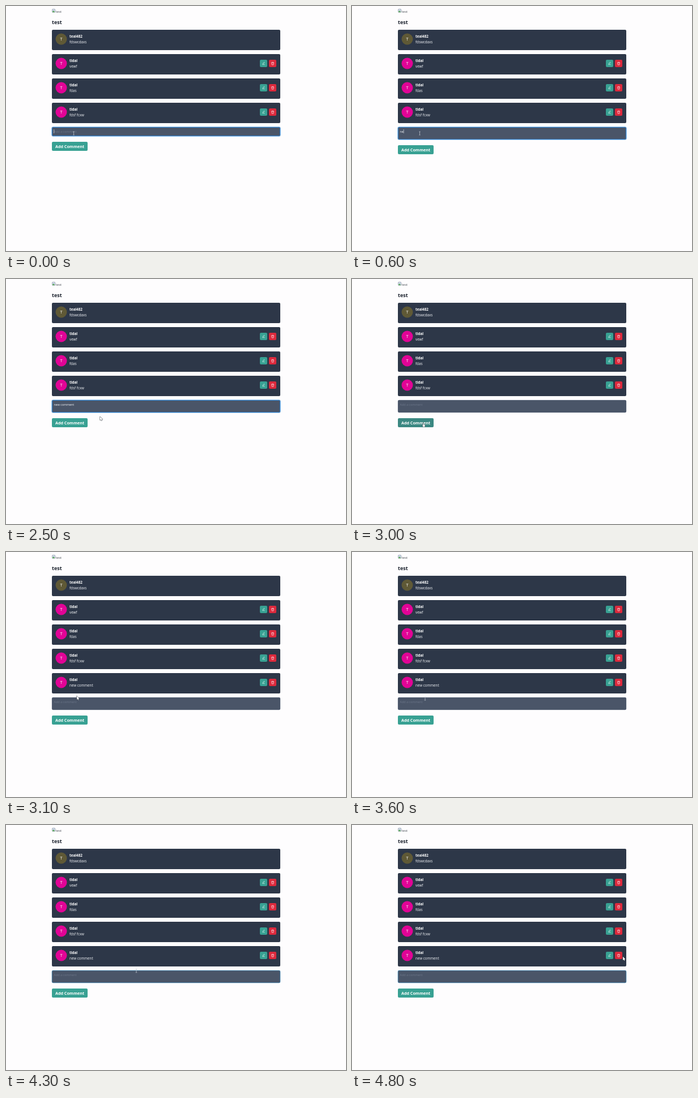
An HTML page with a canvas that plays this animation: 600 by 433 pixels, repeating every 5 s.

```html
<!DOCTYPE html>
<html lang="en">
<head>
<meta charset="utf-8">
<title>Comments</title>
<style>
  html, body { margin: 0; width: 100%; height: 100%; overflow: hidden; background: #fefdfe; }
  canvas { display: block; width: 600px; height: 433px; }
</style>
</head>
<body>
<canvas id="stage" width="600" height="433"></canvas>
<script>
const ctx = document.getElementById('stage').getContext('2d');
const LOOP = 5000;
const FONT = '"Open Sans", "Noto Sans", sans-serif';
const CARD = '#2d3748', FIELD = '#4a5568', TEAL = '#38a193', RED = '#dc2a3d', PINK = '#e10496';
const LEFT = 81, WIDTH = 403, PITCH = 43;

const comments = [
  { name: 'teal482', body: 'fdswcdaxs', color: '#5f5936' },
  { name: 'tidal', body: 'vewf', color: PINK, own: true },
  { name: 'tidal', body: 'fdas', color: PINK, own: true },
  { name: 'tidal', body: 'fdsf fcxw', color: PINK, own: true },
  { name: 'tidal', body: 'new comment', color: PINK, own: true }
];

// [time, typed text]
const typing = [[0, ''], [600, 'ne'], [700, 'new'], [900, 'new '], [1000, 'new co'], [1800, 'new comment'], [3000, '']];

// [time, x, y, pointer shape]
const moves = [
  [0, 119.5, 225, 'beam'], [2200, 119.5, 225, 'beam'], [2300, 143, 223, 'beam'],
  [2400, 171, 231, 'beam'], [2500, 166, 243, 'arrow'], [2600, 140, 253, 'hand'],
  [2700, 126, 255, 'hand'], [3100, 125, 254.5, 'arrow'], [3500, 125, 254.5, 'arrow'],
  [3600, 129, 259, 'beam'], [4000, 158, 262.5, 'beam'], [4200, 160, 263, 'beam'],
  [4600, 440, 242, 'arrow'], [4700, 479, 234, 'arrow'], [4800, 478, 232.5, 'arrow']
];

function box(x, y, w, h, r, fill) {
  ctx.beginPath();
  ctx.roundRect(x, y, w, h, r);
  ctx.fillStyle = fill;
  ctx.fill();
}

function outline(x, y, w, h, color, width) {
  ctx.beginPath();
  ctx.roundRect(x, y, w, h, 2);
  ctx.strokeStyle = color;
  ctx.lineWidth = width;
  ctx.stroke();
}

function text(str, x, y, size, weight, color, align = 'left') {
  ctx.font = `${weight} ${size}px ${FONT}`;
  ctx.fillStyle = color;
  ctx.textAlign = align;
  ctx.fillText(str, x, y);
}

function line(points, color, width, close) {
  ctx.beginPath();
  points.forEach(([x, y], i) => i ? ctx.lineTo(x, y) : ctx.moveTo(x, y));
  if (close) ctx.closePath();
  ctx.strokeStyle = color;
  ctx.lineWidth = width;
  ctx.stroke();
}

function pencil(x, y) {
  line([[x - 1.4, y + 1.1], [x - 1.2, y - 0.1], [x + 1, y - 2.2], [x + 1.9, y - 1.3], [x - 0.3, y + 0.9]], '#e3f5f2', 0.6, true);
  line([[x - 2.2, y + 2.2], [x + 2.3, y + 2.2]], '#e3f5f2', 0.6);
}

function trash(x, y) {
  line([[x - 2.4, y - 1.5], [x + 2.4, y - 1.5]], '#fff0f2', 0.7);
  line([[x - 0.9, y - 1.6], [x - 0.9, y - 2.3], [x + 0.9, y - 2.3], [x + 0.9, y - 1.6]], '#fff0f2', 0.5);
  line([[x - 1.7, y - 1.4], [x - 1.4, y + 2.4], [x + 1.4, y + 2.4], [x + 1.7, y - 1.4]], '#fff0f2', 0.7);
}

function card(c, i) {
  const y = 42 + i * PITCH;
  box(LEFT, y, WIDTH, 36, 2, CARD);
  ctx.beginPath();
  ctx.arc(97.5, y + 16.5, 10, 0, Math.PI * 2);
  ctx.fillStyle = c.color;
  ctx.fill();
  text('T', 97.5, y + 19.2, 7.4, 500, '#fff', 'center');
  text(c.name, 112, y + 14.2, 6.25, 700, '#fff');
  text(c.body, 112, y + 24, 6.25, 400, '#f4f6f9');
  if (!c.own) return;
  box(448, y + 10, 13, 13, 2, TEAL);
  box(464, y + 10, 13, 13, 2, RED);
  pencil(454.5, y + 16.4);
  trash(470.6, y + 16.6);
}

function header() {
  // broken image icon with alt text
  box(81.3, 5.2, 5.6, 6.2, 0.4, '#c9d4e4');
  outline(81.3, 5.2, 5.6, 6.2, '#8d949c', 0.5);
  ctx.beginPath();
  ctx.moveTo(81.7, 11);
  ctx.lineTo(83.5, 8);
  ctx.lineTo(86.3, 10.8);
  ctx.fillStyle = '#4fa34b';
  ctx.fill();
  text('test', 87.6, 12, 6.1, 400, '#4a4f58');
  text('test', 81, 32, 9, 700, '#1a202c');
}

function field(t, y, h, typed) {
  const active = t < 3000, refocus = t >= 4200;
  if (active) outline(LEFT - 0.3, y - 0.3, WIDTH + 0.6, h + 0.6, '#9cc7ea', 1);
  box(LEFT, y, WIDTH, h, 2, FIELD);
  if (active) outline(LEFT + 0.4, y + 0.4, WIDTH - 0.8, h - 0.8, '#3182ce', 1);
  else if (refocus) outline(LEFT + 0.2, y + 0.2, WIDTH - 0.4, h - 0.4, '#4189b8', 0.8);
  else outline(LEFT + 0.3, y + 0.3, WIDTH - 0.6, h - 0.6, '#566278', 0.6);

  if (typed) text(typed, 84.5, y + 9.7, 5.35, 400, '#f4f6f9');
  else text('Add a comment', 84.5, y + 9.7, 5.4, 400, '#6c778a');
  if (t < 2300) {
    ctx.font = `400 5.35px ${FONT}`;
    const w = typed ? ctx.measureText(typed).width : 0;
    ctx.fillStyle = '#eef1f5';
    ctx.fillRect(84.5 + w, y + 4, 0.6, 7);
  }
}

function pointer(t) {
  let i = moves.length - 1;
  while (moves[i][0] > t) i--;
  const a = moves[i], b = moves[i + 1] || a;
  const k = b === a ? 0 : (t - a[0]) / (b[0] - a[0]);
  const x = a[1] + (b[1] - a[1]) * k, y = a[2] + (b[2] - a[2]) * k;
  if (a[3] === 'beam') {
    line([[x, y - 3], [x, y + 3]], '#c3c9d2', 0.7);
    for (const s of [-3, 3]) line([[x - 1.3, y + s], [x + 1.3, y + s]], '#c3c9d2', 0.6);
    return;
  }
  const shape = a[3] === 'hand'
    ? [[0, 0], [0.9, 0], [1.1, 2.5], [3.6, 3.4], [3.2, 6.8], [0.5, 6.8], [-1.4, 4.2], [0, 4.2]]
    : [[0, 0], [0, 6.6], [1.5, 5.3], [2.5, 7.5], [3.5, 7], [2.6, 5], [4.5, 4.8]];
  const pts = shape.map(([px, py]) => [x + px, y + py]);
  line(pts, '#1d232c', 0.9, true);
  ctx.fillStyle = '#fff';
  ctx.fill();
}

function draw(t) {
  ctx.fillStyle = '#fefdfe';
  ctx.fillRect(0, 0, 600, 433);
  header();

  const count = t < 3100 ? 4 : 5;
  comments.slice(0, count).forEach(card);

  const typed = typing.findLast(([at]) => at <= t)[1];
  const top = 42 + count * PITCH, h = t < 600 ? 16 : 22;
  field(t, top, h, typed);

  const pressed = t >= 3000 && t < 3100;
  box(LEFT, top + h + 10, 63, 16, 2, pressed ? '#3b8882' : TEAL);
  text('Add Comment', LEFT + 31.5, top + h + 20.6, 7.2, 700, '#fff', 'center');
  pointer(t);
}

const start = performance.now();
function tick() {
  const t = (performance.now() - start) % LOOP;
  draw(Math.floor(t / 100) * 100);
  requestAnimationFrame(tick);
}
tick();
</script>
</body>
</html>
```
